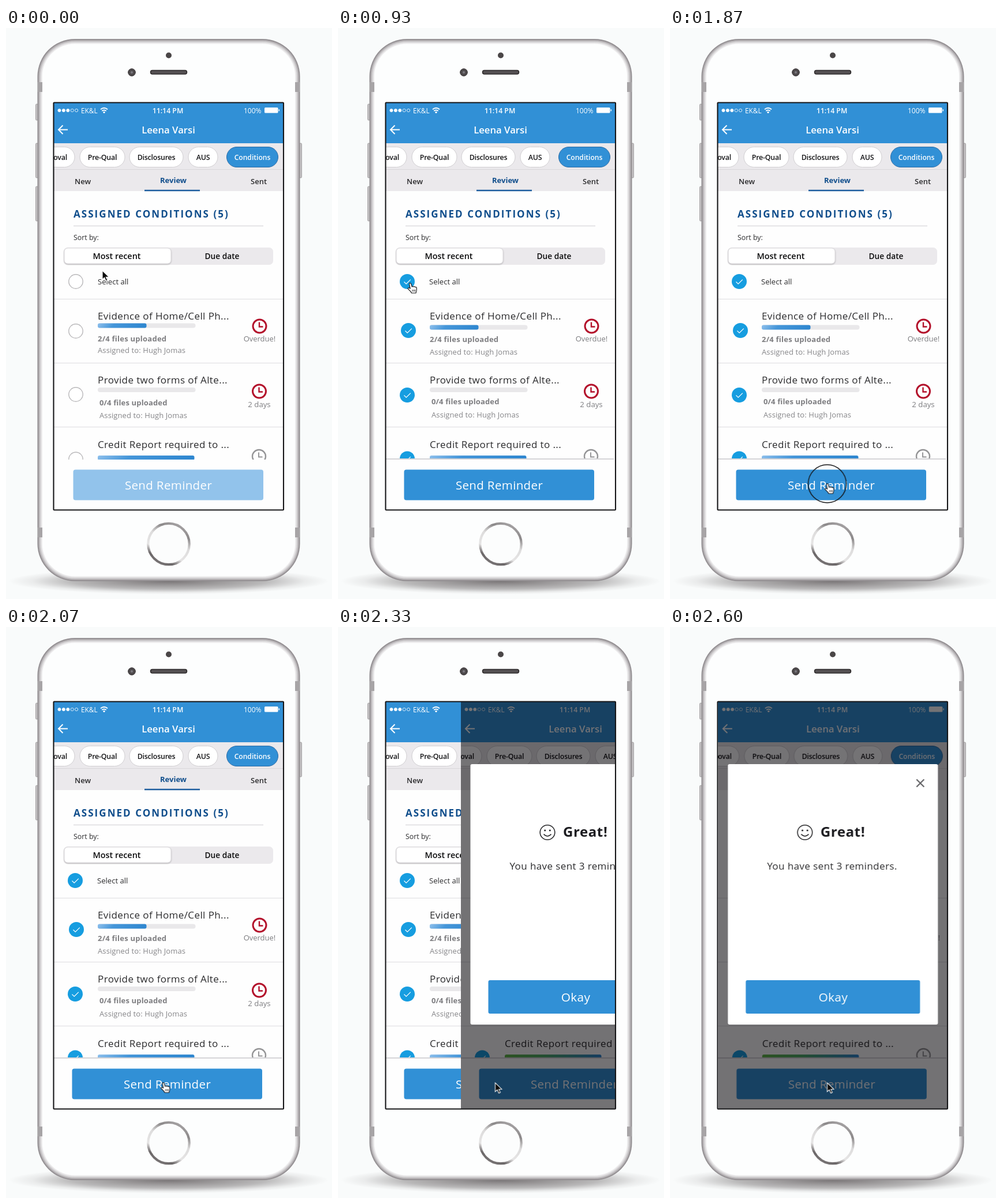
Recreate the animation shown at these times as an HTML page. Size 565 by 991 pixels, loop 2670 ms.

```html
<!DOCTYPE html>
<html lang="en">
<head>
<meta charset="utf-8">
<title>Send reminder</title>
<style>
html, body { margin: 0; width: 100%; height: 100%; overflow: hidden; background: #f9fbfb; }
svg { display: block; width: 565px; height: 991px; font-family: "Open Sans", "Noto Sans", sans-serif; }
.slide, .cursor, .arrow, .hand, .ring, .off, .on { animation: 2670ms infinite step-end; }
.slide { animation-name: slide; animation-timing-function: linear; }
.cursor { animation-name: move; animation-timing-function: ease-in-out; }
.arrow { animation-name: arrow; }
.hand { animation-name: hand; }
.ring { animation-name: ring; }
.off { animation-name: off; }
.on { animation-name: on; }
@keyframes slide {
  0% { transform: translateX(400px); }
  80% { transform: translateX(400px); animation-timing-function: ease; }
  98.5%, 100% { transform: none; }
}
@keyframes move {
  0%, 2.6% { transform: translate(167px, 421px); }
  17.6%, 40% { transform: translate(125px, 443px); }
  60%, 100% { transform: translate(272.5px, 791px); }
}
@keyframes arrow { 0%, 42.3%, 80.1% { opacity: 1; } 15%, 55% { opacity: 0; } }
@keyframes hand { 0%, 42.3%, 80.1% { opacity: 0; } 15%, 55% { opacity: 1; } }
@keyframes ring { 0%, 29.9%, 77.5% { opacity: 0; } 25%, 67.4% { opacity: 1; } }
@keyframes off { 0% { opacity: 1; } 29.9% { opacity: 0; } }
@keyframes on { 0% { opacity: 0; } 29.9% { opacity: 1; } }
</style>
</head>
<body>
<svg id="stage" viewBox="0 0 565 991"></svg>
<script>
const BLUE = '#3190d6', NAVY = '#104e8c', INK = '#2b2b2d', GREY = '#7d7d80';

const box = (x, y, w, h, r, fill, more = '') =>
  `<rect x="${x}" y="${y}" width="${w}" height="${h}" rx="${r}" fill="${fill}" ${more}/>`;
const dot = (x, y, r, fill, more = '') =>
  `<circle cx="${x}" cy="${y}" r="${r}" fill="${fill}" ${more}/>`;
const path = (d, color, w, more = '') =>
  `<path d="${d}" fill="none" stroke="${color}" stroke-width="${w}" ${more}/>`;
const text = (s, x, y, size, fill = INK, { w = 400, ls = 0, at = 'start' } = {}) =>
  `<text x="${x}" y="${y}" font-size="${size}" fill="${fill}" font-weight="${w}" letter-spacing="${ls}" text-anchor="${at}">${s}</text>`;
const ramp = (id, dir, ...stops) => {
  const [x1, y1, x2, y2] = dir;
  const marks = stops.map(([o, c]) => `<stop offset="${o}" stop-color="${c}"/>`).join('');
  return `<linearGradient id="${id}" x1="${x1}" y1="${y1}" x2="${x2}" y2="${y2}">${marks}</linearGradient>`;
};

const defs = `<defs>
  ${ramp('home', [.75, 0, .25, 1], [0, '#a9a6a7'], [.2, '#8b8889'], [.42, '#dddcdc'], [.7, '#e6e5e5'], [.86, '#6b6768'], [1, '#7b7778'])}
  ${ramp('fill', [0, 0, 1, .08], [0, '#8fc0ec'], [.35, '#4596d9'], [1, '#2f87d0'])}
  ${ramp('mix', [0, 0, 1, 0], [0, '#62b848'], [.4, '#4fae67'], [1, '#2f87d0'])}
  <radialGradient id="shade"><stop offset="0" stop-color="#241c1e" stop-opacity=".6"/><stop offset=".6" stop-color="#241c1e" stop-opacity=".3"/><stop offset=".85" stop-color="#241c1e" stop-opacity=".07"/><stop offset="1" stop-color="#241c1e" stop-opacity="0"/></radialGradient>
  <filter id="soft" x="-10%" y="-30%" width="120%" height="170%"><feDropShadow dx="0" dy="1" stdDeviation="1" flood-opacity=".3"/></filter>
  <clipPath id="screen"><rect x="83" y="130" width="398" height="706"/></clipPath>
  <clipPath id="list"><rect x="83" y="284" width="398" height="465"/></clipPath>
</defs>`;

function phone() {
  const rim = ['#8f8b8e', '#a8a4a7', '#bebbbd', '#d0ced0', '#e0dfe0', '#eeedee', '#fdfefe'].map((color, i) => {
    const d = i * 1.4;
    return box(54.5 + d, 19 + d, 455 - 2 * d, 941 - 2 * d, 65 - d, color);
  }).join('');
  const bands = [94, 867].map(y => box(55, y, 8, 17, 0, '#a7a4a6') + box(501, y, 8, 17, 0, '#a7a4a6')).join('');
  const keys = [[51.5, 132, 28], [51.5, 200, 60], [51.5, 275, 60], [508.5, 200, 60]]
    .map(([x, y, h]) => box(x, y, 4, h, 1.5, '#c5c2c4', 'stroke="#959294" stroke-width=".8"')).join('');
  return box(0, 0, 565, 991, 0, '#f9fbfb')
    + '<ellipse cx="282" cy="960" rx="278" ry="23" fill="url(#shade)"/>'
    + keys + rim + bands
    + dot(282, 47.5, 5, '#4a4647')
    + dot(218, 77, 6.3, '#4d494b', 'stroke="#2e2b2c"') + dot(218, 77, 2.2, '#77757a')
    + box(250.5, 73.5, 63, 6.5, 3.2, '#555153', 'stroke="#2e2b2c" stroke-width="1.5"')
    + dot(282, 895.5, 35.7, '#fcfdfd', 'stroke="url(#home)" stroke-width="4.2"');
}

function header() {
  const signal = [0, 1, 2, 3, 4].map(i =>
    dot(92.5 + i * 7.4, 143, 2.6, i < 3 ? '#fff' : 'none', 'stroke="#fff" stroke-width=".8"')).join('');
  const wifi = path('M164 141.3q6-5 12 0M166.3 144q3.7-3 7.4 0', '#fff', 1.8) + dot(170, 146.3, 1.6, '#fff');
  const pills = [['Pre-Qual', 128, 78], ['Disclosures', 214, 93], ['AUS', 316, 51]].map(([s, x, w]) =>
    box(x, 206.5, w, 35, 17.5, '#fff', 'stroke="#d0ced1"')
    + text(s, x + w / 2, 228.5, 12.4, '#151517', { w: 600, ls: -.2, at: 'middle' })).join('');
  return box(83, 129, 399, 71, 0, BLUE)
    + signal + wifi
    + text('EK&amp;L', 130, 147.5, 11.8, '#fff')
    + text('11:14 PM', 280.5, 147.5, 12.3, '#fff', { w: 600, at: 'middle' })
    + text('100%', 412, 147.5, 12, '#fff')
    + box(448, 138, 23.5, 9.5, 1.5, '#fff') + box(472.5, 141, 1.5, 3.5, .7, '#fff')
    + path('M107 176.5H91.5M98.5 169l-7.5 7.5 7.5 7.5', '#fff', 2)
    + text('Leena Varsi', 281.5, 182.5, 16.7, '#fff', { w: 600, at: 'middle' })
    + box(83, 200, 399, 83, 0, '#ebe9ec')
    + path('M83 245.5H482', '#d9d7da', 1)
    + box(50, 206.5, 69, 35, 17.5, '#fff', 'stroke="#d0ced1"')
    + text('Approval', 106, 228.5, 12.4, '#151517', { w: 600, ls: -.2, at: 'end' })
    + pills
    + box(382.5, 206.5, 89, 35, 17.5, BLUE, 'stroke="#2a6ba6"')
    + text('Conditions', 427, 228.5, 12.1, '#fff', { w: 600, at: 'middle' })
    + text('New', 119, 270.5, 13, INK, { w: 600 })
    + text('Review', 290, 269, 13, NAVY, { w: 700, at: 'middle' })
    + text('Sent', 424, 270.5, 13, INK, { w: 600 })
    + path('M240 282H336', '#1d5d9e', 2.4);
}

const clock = (x, y, color, w) =>
  dot(x, y, 11.5, 'none', `stroke="${color}" stroke-width="${w}"`) + path(`M${x - .5} ${y - 7}v8h6.5`, color, w * .8);

const check = (on, x, y) => on
  ? dot(x, y, 13, '#169de0') + path(`M${x - 5.5} ${y + .5}l3.7 3.7 7.6-7.6`, '#fff', 1.2)
  : dot(x, y, 12.2, '#fff', 'stroke="#b9b8ba" stroke-width="1.4"');

const track = y => box(159, y - 4, 169.5, 8, 4, '#e9e8ea');

// The two states of the list differ by a few pixels of layout.
function page(on, bar = 'fill') {
  const p = (a, b) => on ? b : a;
  const bold = { w: 700, ls: .25 }, name = { ls: .4 };
  const owner = 'Assigned to: Hugh Jomas';
  const y1 = p(516.5, 519.5);
  const bx = p(116.5, 114.5);
  const list = [470.5, 581.5, 692.5].map(y => path(`M83 ${y}H482`, '#dddce0', 1.2)).join('')
    + check(on, p(121, 120), 440)
    + text('Select all', p(159, 158), 445.3, 13.1, INK)
    + check(on, p(121, 122), p(526, 525))
    + text('Evidence of Home/Cell Ph...', 159, 506, 17, INK, name)
    + track(y1) + box(159, y1 - 4, 84.5, 8, 3, 'url(#fill)')
    + text('2/4 files uploaded', 159, p(544, 545.3), 13, GREY, bold)
    + text(owner, 159, p(564.3, 567.3), 13, '#858588', { ls: .1 })
    + clock(439.5, 517.5, '#b3112b', 3)
    + text('Overdue!', 439.5, 544, 13, GREY, { at: 'middle' })
    + check(on, p(121, 120), p(636, 637))
    + text('Provide two forms of Alte...', 159, 617, 17, INK, name)
    + track(628)
    + text('0/4 files uploaded', 162, p(655.3, 653.3), 13, GREY, { w: 700, ls: .15 })
    + text(owner, 162, p(677.3, 676.3), 13, '#858588', { ls: .1 })
    + clock(439, 630.5, '#b3112b', 3)
    + text('2 days', 439, 657.5, 13.2, GREY, { at: 'middle' })
    + check(on, p(121, 120), p(748.5, 747.5))
    + text('Credit Report required to ...', 159, 729, 17, INK, name)
    + box(159, 742, 167.5, 8, 3, `url(#${bar})`)
    + clock(438.5, 743.5, '#949496', 2.4);
  const body = box(83, 129, 399, 708, 0, '#fefefe')
    + header()
    + text('ASSIGNED CONDITIONS (5)', 117, 329, 17, NAVY, { w: 700, ls: 2.05 })
    + path('M117 343.5H446', '#dcdbde', 1.4)
    + text('Sort by:', 117, 368, 12.4, INK)
    + box(100, 381, 363, 30, 7, '#ebe9ec')
    + box(101, 382, 185, 27, 6, '#fff', 'stroke="#d2d0d3" stroke-width=".8" filter="url(#soft)"')
    + text('Most recent', 192, 401, 14.4, '#0c0c0d', { w: 600, at: 'middle' })
    + text('Due date', 374.5, 401, 13.7, '#0c0c0d', { w: 600, at: 'middle' })
    + `<g clip-path="url(#list)">${list}</g>`
    + (on ? box(83, 748, 399, 89, 0, '#fefefe') + path('M83 748H478', '#d5d4d7', 2) : '')
    + box(bx, 766.5, 329.5, 53, 4, p('#92c3eb', BLUE))
    + text('Send Reminder', bx + 165, 801, 20.5, '#fff', { ls: .35, at: 'middle' });
  return `<g clip-path="url(#screen)">${body}</g>`;
}

function modal() {
  return box(83, 129, 399, 708, 0, '#030004', 'fill-opacity=".55"')
    + box(99.5, 238, 364, 452, 3, '#fff')
    + path('M426.5 264.5l13 13m0-13l-13 13', '#636366', 2.2)
    + dot(233, 356.5, 12.8, 'none', `stroke="${INK}" stroke-width="1.6"`)
    + dot(228.7, 353, 1.6, INK) + dot(237.3, 353, 1.6, INK)
    + path('M226.5 359.5q6.5 7 13 0', INK, 1.6)
    + text('Great!', 260, 364, 24, '#1c1c20', { w: 700, ls: .6 })
    + text('You have sent 3 reminders.', 167.5, 421.3, 17, INK, { ls: .4 })
    + box(130.5, 613, 302, 58, 3, BLUE)
    + text('Okay', 282, 650, 20.8, '#fff', { ls: .3, at: 'middle' });
}

const cursor = `<g class="cursor">
  <circle class="ring" r="33" fill="none" stroke="#141416" stroke-width="1.5"/>
  <path class="arrow" d="M0 0V15.5L3.6 12.2 6.2 18 8.8 16.9 6.3 11.2H11.3Z" fill="#0a0a0a" stroke="#fff" stroke-width="1.1"/>
  <g class="hand" stroke="#1b1b1d" stroke-width="1.2" stroke-linejoin="round">
    <path d="M-1.5 1.5Q-1.3-.8.5-.2 1.6.2 2.2 2.5L3.2 6.2Q4.8 4.8 6 6.2 7.8 5 8.8 6.7 11 6 11.3 8.5L11.2 12Q10.8 14 10 17H2.5Q1.5 14.5-3 10.5-4.5 8.5-2.8 7.8-1.5 7.7.2 9.2Z" fill="#fff"/>
    <path d="M4 11v3.5M6.3 11v3.5M8.5 11v3.5" fill="none" stroke-width=".9"/>
  </g>
</g>`;

document.getElementById('stage').innerHTML = defs + phone()
  + `<g clip-path="url(#screen)">
    <g class="off">${page(false)}</g>
    <g class="on">${page(true)}</g>
    <g class="slide">${page(true, 'mix')}${modal()}</g>
  </g>`
  + box(82.5, 129.5, 398.5, 707, 1, 'none', 'stroke="#161618" stroke-width="2.1"')
  + cursor;
</script>
</body>
</html>
```
